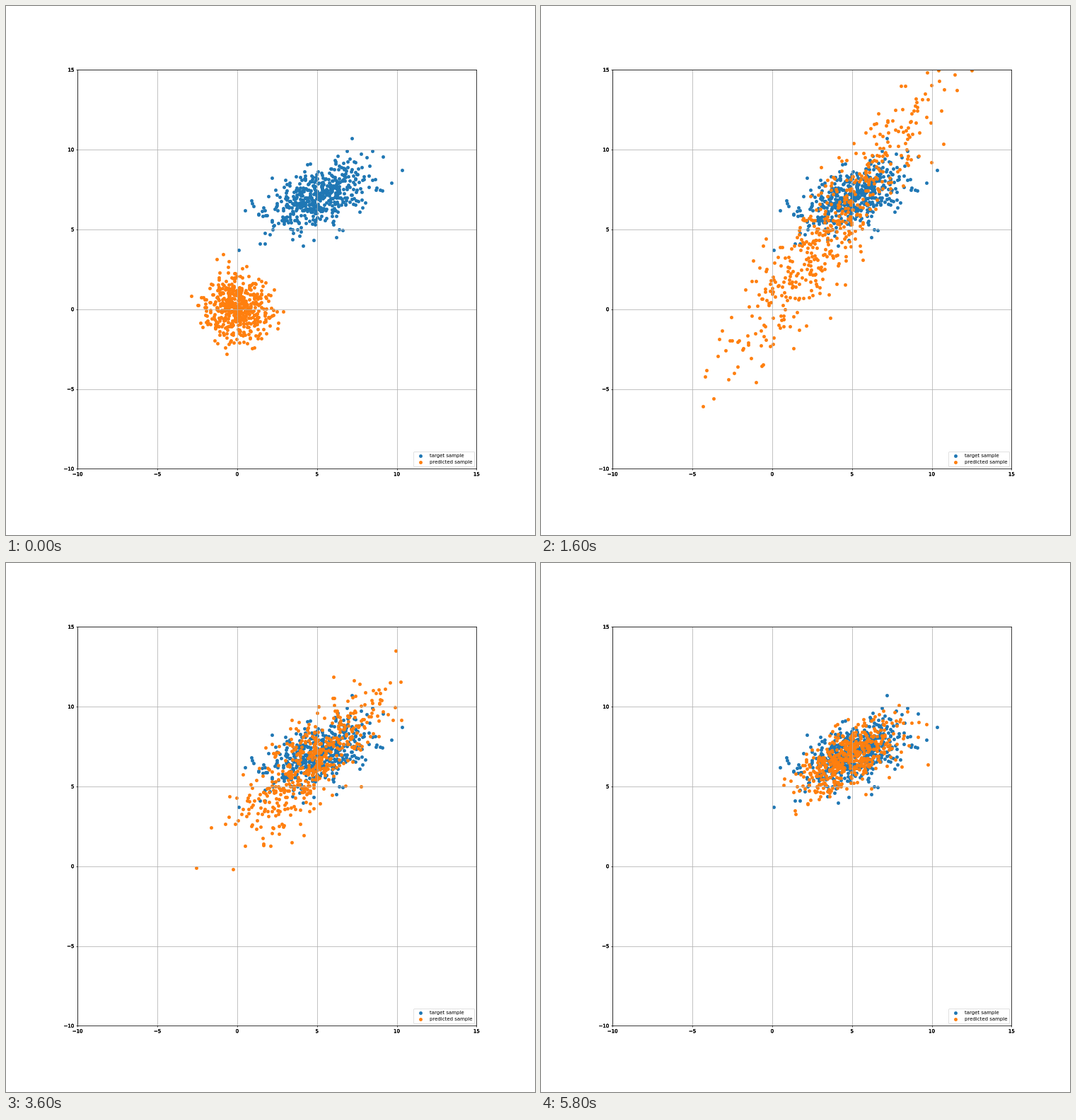
These frames come from a looping animation (748x748 px, 6000 ms). A matplotlib script:

```python
import matplotlib.pyplot as plt
import matplotlib.patheffects as pe
import numpy as np
from matplotlib.animation import FuncAnimation

SIZE, DPI = 748, 50
LEFT, BOTTOM, SIDE = 101.3, 654.4, 564.1   # plot area in pixels, y downwards
LO, HI = -10, 15
STEPS, STEP_MS = 30, 200
N = 500
GOAL = 5, 7


def cloud(seed, mean, std, corr):
    """Seeded sample of a correlated 2D normal distribution."""
    u, v = np.random.default_rng(seed).standard_normal((2, N))
    w = corr * u + np.sqrt(1 - corr ** 2) * v
    return np.column_stack([mean[0] + std[0] * u, mean[1] + std[1] * w])


def predicted(step):
    """The fit jumps wide at first, then slowly settles on the goal."""
    reach = 1 - np.exp(-0.34 * step ** 0.675)
    wake = 1 - np.exp(-1.2 * step)
    left = 1 - step / STEPS
    excess = 5.2 * left ** 1.8
    std = 1 + wake * (0.6 + 0.5 * excess), 1 + wake * (0.15 + excess)
    corr = wake * (0.62 + 0.39 * left)
    return cloud(100 + step, np.multiply(GOAL, reach), std, corr)


plt.rcParams.update({"font.family": "DejaVu Sans", "font.size": 10})
fig = plt.figure(figsize=(SIZE / DPI, SIZE / DPI), dpi=DPI, facecolor="white")
ax = fig.add_axes([LEFT / SIZE, 1 - BOTTOM / SIZE, SIDE / SIZE, SIDE / SIZE])
ticks = range(LO, HI + 1, 5)
ax.set(xlim=(LO, HI), ylim=(LO, HI), xticks=ticks, yticks=ticks)
ax.grid(color="#b0b0b0", lw=1.1)
ax.tick_params(width=1)
for spine in ax.spines.values():
    spine.set_linewidth(1.1)
for label in ax.get_xticklabels() + ax.get_yticklabels():
    label.set_path_effects([pe.withStroke(linewidth=0.5, foreground="black")])

target = cloud(3, GOAL, (1.6, 1.1), 0.58)
ax.scatter(*target.T, color="#1f77b4", label="target sample")
dots = ax.scatter(*predicted(0).T, color="#ff7f0e", label="predicted sample")
ax.legend(loc="lower right")


def update(step):
    dots.set_offsets(predicted(step))
    return dots,


anim = FuncAnimation(fig, update, frames=STEPS, interval=STEP_MS,
                     repeat=True, repeat_delay=0)
plt.show()
```
